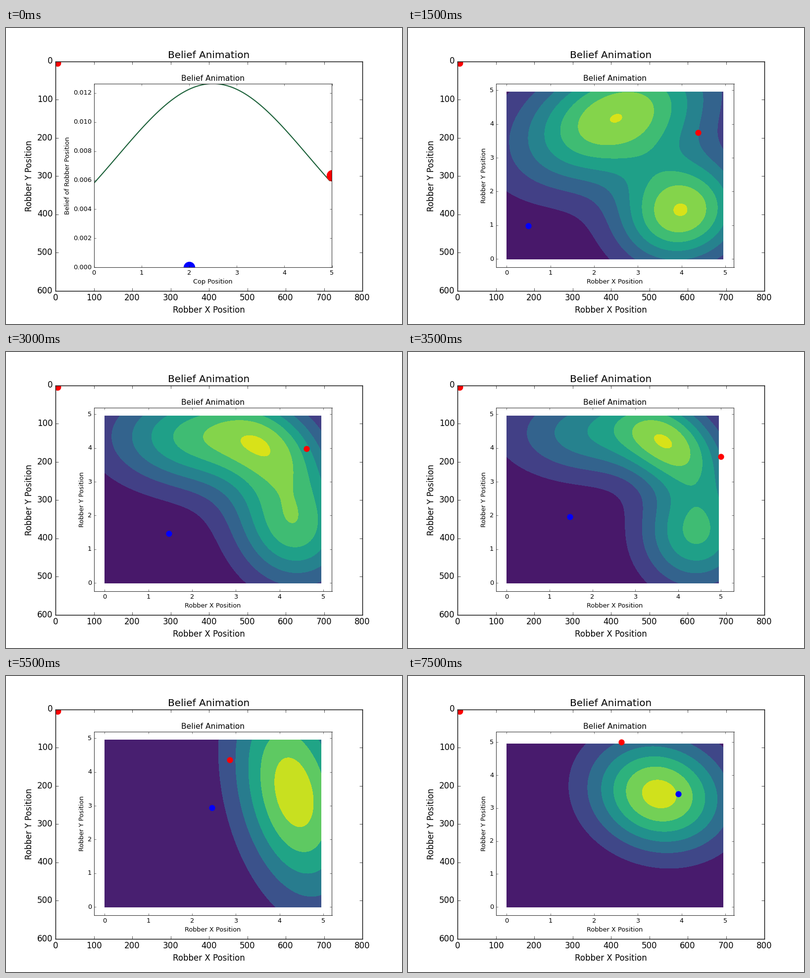
A matplotlib script for the animation above (8 s loop, 800 px wide and 600 px high).

```python
import numpy as np
import matplotlib.pyplot as plt
from matplotlib.animation import FuncAnimation

plt.rcParams.update({
    "font.family": "DejaVu Sans", "font.size": 12,
    "axes.titlesize": 14.4, "axes.labelsize": 12,
    "axes.titlepad": 5, "axes.labelpad": 5,
    "axes.linewidth": 1.0, "axes.axisbelow": False,
    "xtick.direction": "in", "ytick.direction": "in",
    "xtick.top": True, "ytick.right": True,
    "xtick.major.size": 4, "ytick.major.size": 4,
    "xtick.major.width": 0.5, "ytick.major.width": 0.5,
    "xtick.major.pad": 4, "ytick.major.pad": 4,
    "ytick.alignment": "center",
    "figure.facecolor": "white",
})

W, H = 800, 600
FRAMES, INTERVAL = 16, 500
SHRINK = 0.775                        # size of the inner plot's text and ticks
LEFT, RIGHT, TOP, BOTTOM = 177.5, 658.5, 112.8, 485.2
SPAN = 4.95                           # extent of the belief grid
CELL = 0.49                           # one cop step
AXIS = np.linspace(0, SPAN, 100)
X, Y = np.meshgrid(AXIS, AXIS)


def blob(weight, cx, cy, sx, sy, rho=0.0):
    """Correlated Gaussian over the belief grid."""
    a, b = (X - cx) / sx, (Y - cy) / sy
    q = (a * a - 2 * rho * a * b + b * b) / (1 - rho * rho)
    return weight * np.exp(-q / 2)


def scaled(peak, *blobs):
    z = sum(blobs)
    return z * peak / z.max()


# step -> (belief surface in units of one band, number of bands)
BELIEF = {
    3: (scaled(7.08, blob(7.0, 2.48, 4.2, 1.53, 1.35, 0.35),
               blob(6.95, 4.0, 1.4, 1.0, 1.1, 0.1)), 8),
    5: (scaled(7.22, blob(6.5, 2.2, 4.25, 1.42, 1.1),
               blob(6.4, 4.12, 2.2, 1.0, 1.45, -0.2)), 8),
    7: (scaled(7.12, blob(3.9, 2.1, 4.45, 1.45, 0.95),
               blob(5.2, 3.85, 4.1, 0.85, 0.95, -0.4),
               blob(5.4, 4.42, 1.5, 0.9, 1.15)), 8),
    11: (blob(5.6, 4.33, 3.4, 0.93, 2.15, -0.3), 6),
    13: (blob(7.55, 3.5, 3.61, 0.676, 0.79, -0.06), 8),
    15: (blob(6.41, 3.49, 3.43, 1.074, 1.17, -0.11), 7),
}
KEYS = sorted(BELIEF)

# cop moves right or up by one cell each step
MOVES = "RUURRUUURURRURR"

# robber path at a few steps
ROBBER_T = [1, 3, 5, 7, 11, 13, 15]
ROBBER_X = [4.6, 4.38, 4.24, 5.0, 2.86, 2.91, 2.62]
ROBBER_Y = [3.4, 3.74, 4.2, 3.75, 4.36, 4.4, 5.0]


def belief(step):
    """Blend the two nearest surfaces, relative to their band count."""
    step = max(step, KEYS[0])
    i = min(np.searchsorted(KEYS, step, side="right"), len(KEYS) - 1)
    a, b = KEYS[i - 1], KEYS[i]
    t = (step - a) / (b - a)
    (za, na), (zb, nb) = BELIEF[a], BELIEF[b]
    bands = int(round(na + (nb - na) * t))
    z = (1 - t) * za / na + t * zb / nb
    peak = (1 - t) * za.max() / na + t * zb.max() / nb
    return np.clip(z * peak / z.max() * bands, 0.01, bands - 0.01), bands


fig = plt.figure(figsize=(W / 100, H / 100), dpi=100)

outer = fig.add_axes([0.125, 67.5 / H, 0.775, 465 / H])
outer.set_xlim(0, 800)
outer.set_ylim(600, 0)
outer.set_xticks(range(0, 801, 100))
outer.set_yticks(range(0, 601, 100))
outer.set_title("Belief Animation")
outer.set_xlabel("Robber X Position")
outer.set_ylabel("Robber Y Position")
outer.plot([5], [5], "o", color="red", ms=10, mew=0)

inner = fig.add_axes([LEFT / W, 1 - BOTTOM / H, (RIGHT - LEFT) / W, (BOTTOM - TOP) / H])


def dot(x, y, color, size=8.8):
    inner.plot([x], [y], "o", color=color, ms=size, mew=0)


def dress(xlabel, ylabel):
    s = SHRINK
    inner.set_title("Belief Animation", fontsize=14.4 * s, pad=5 * s)
    inner.set_xlabel(xlabel, fontsize=12 * s, labelpad=5 * s)
    inner.set_ylabel(ylabel, fontsize=12 * s, labelpad=5 * s)
    inner.set_xticks(range(6))
    inner.tick_params(labelsize=12 * s, length=4 * s, width=0.5 * s, pad=4 * s)
    for spine in inner.spines.values():
        spine.set(linewidth=s, edgecolor="#333333")


def draw_curve():
    p = np.exp(-((AXIS - 2.5) / 2) ** 2 / 2)
    p /= p.sum()
    inner.plot(AXIS, p, color="#1a6038", lw=1.5)
    dot(2, 0, "blue", 16.8)
    dot(5, 0.00633, "red", 16.8)
    dress("Cop Position", "Belief of Robber Position")
    ticks = [0.002 * k for k in range(7)]
    inner.set_yticks(ticks, [f"{v:.3f}" for v in ticks])
    inner.set_xlim(0, 5)
    inner.set_ylim(0, p.max())


def draw_map(step):
    z, bands = belief(step)
    colors = [plt.cm.viridis((k + 0.5) / bands) for k in range(bands)]
    inner.contourf(AXIS, AXIS, z, levels=np.arange(bands + 1), colors=colors)
    path = MOVES[:step]
    dot(path.count("R") * CELL, path.count("U") * CELL,
        "green" if step == 13 else "blue")
    rx = np.interp(step, ROBBER_T, ROBBER_X)
    ry = np.interp(step, ROBBER_T, ROBBER_Y)
    dot(rx, ry, "red")
    dress("Robber X Position", "Robber Y Position")
    inner.set_yticks(range(6))
    # a robber on the border stretches its axis
    mx, my = max(SPAN, rx + 0.05), max(SPAN, ry + 0.07)
    inner.set_xlim(-0.05 * mx, 1.05 * mx)
    inner.set_ylim(-0.05 * my, 1.05 * my)


def draw(step):
    inner.cla()
    if step == 0:
        draw_curve()
    else:
        draw_map(step)
    return []


anim = FuncAnimation(fig, draw, frames=FRAMES, interval=INTERVAL,
                     repeat=True, repeat_delay=0, blit=False)
plt.show()
```
